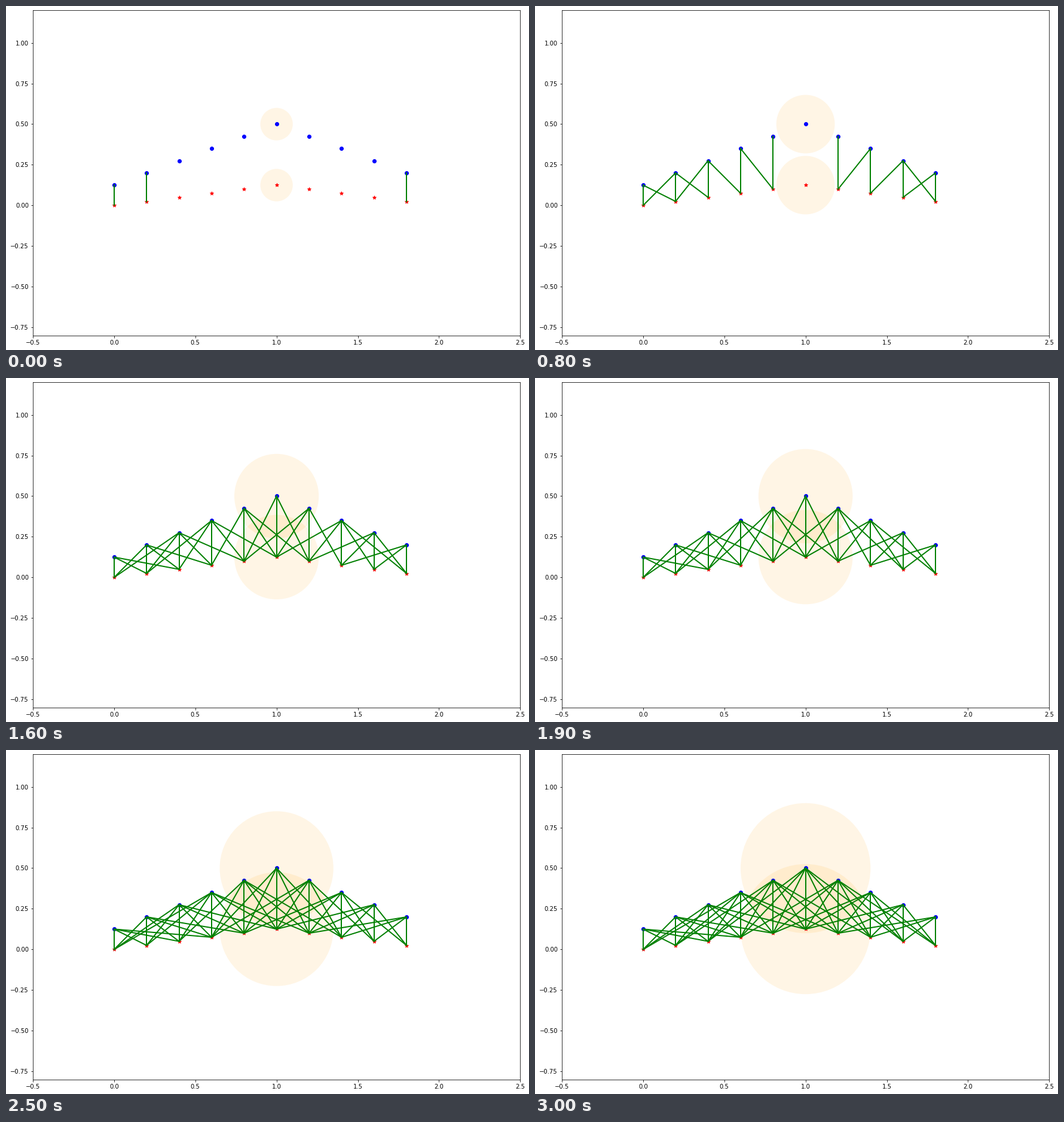
Animation of 875x575 px, one loop 3100 ms. Source, as a matplotlib script:

```python
import itertools

import matplotlib.pyplot as plt
import numpy as np
from matplotlib.animation import FuncAnimation

W, H, DPI = 875, 575, 72
FRAMES, INTERVAL = 31, 100
LEFT, BOTTOM, UNIT = 44.94, 24.18, 271.8  # pixels; UNIT is one data unit

plt.rcParams.update({"font.family": "DejaVu Sans", "font.size": 10})

# Two tent-shaped rows of points that peak at x = 1
x = np.arange(10) * 0.2
tent = 1 - np.abs(x - 1)
upper = np.column_stack([x, 0.125 + 0.375 * tent])
lower = np.column_stack([x, 0.125 * tent])


def radius(frame):
    return 0.1 + 0.01 * frame


fig = plt.figure(figsize=(W / DPI, H / DPI), dpi=DPI, facecolor="white")
ax = fig.add_axes([LEFT / W, BOTTOM / H, 3 * UNIT / W, 2 * UNIT / H])
ax.set_xlim(-0.5, 2.5)
ax.set_ylim(-0.8, 1.2)
ax.set_xticks(np.arange(-0.5, 2.6, 0.5))
ax.set_yticks(np.arange(-0.75, 1.1, 0.25))

discs = [
    ax.add_patch(plt.Circle(row[5], radius(0), fc="orange", lw=0, alpha=0.1, zorder=0.5))
    for row in (upper, lower)
]
ax.scatter(*upper.T, s=36, color="blue", marker="o", zorder=1)
ax.scatter(*lower.T, s=36, color="red", marker="*", zorder=1)

# Every possible link with its length; a link shows once the discs would touch
links = []
for p, q in itertools.product(upper, lower):
    length = np.hypot(*(p - q))
    if length <= 2 * radius(FRAMES - 1):
        line, = ax.plot([p[0], q[0]], [p[1], q[1]], color="green", lw=2, zorder=2)
        links.append((line, length))


def update(frame):
    r = radius(frame)
    for disc in discs:
        disc.set_radius(r)
    for line, length in links:
        line.set_visible(length <= 2 * r)
    return discs + [line for line, _ in links]


anim = FuncAnimation(fig, update, frames=FRAMES, interval=INTERVAL,
                     init_func=lambda: update(0), repeat=True, repeat_delay=0)
plt.show()
```
